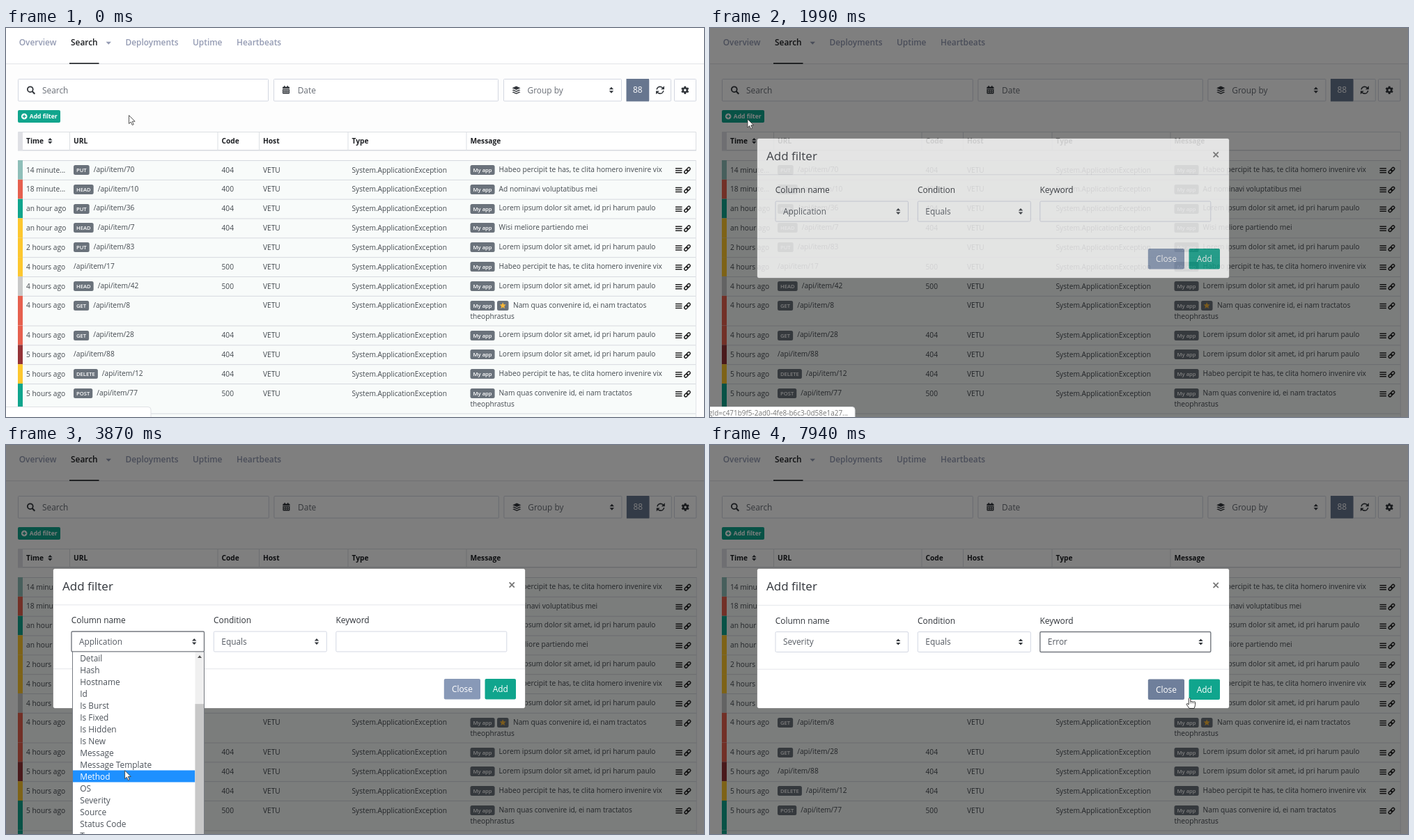
An HTML page with a canvas that plays this animation: 1002x559 px, repeating every 8000 ms.

```html
<!DOCTYPE html>
<html lang="en">
<head>
<meta charset="utf-8">
<title>Add filter</title>
<style>
html, body { margin: 0; width: 1002px; height: 559px; overflow: hidden; background: #fff; }
canvas { display: block; }
</style>
</head>
<body>
<canvas id="stage" width="1002" height="559"></canvas>
<script>
const W = 1002, H = 559, LOOP = 8000;
const screen2d = document.getElementById('stage').getContext('2d');
const sheet = Object.assign(document.createElement('canvas'), { width: W, height: H });
const sheet2d = sheet.getContext('2d');
let g = screen2d;

const GREEN = '#10a58d', YELLOW = '#fdc72f', RED = '#e6604f', INK = '#43494f', LINE = '#d6d9df', SLATE = '#6a727b';
const HOST = 'VETU', TYPE = 'System.ApplicationException';
const HABEO = 'Habeo percipit te has, te clita homero invenire vix';
const LOREM = 'Lorem ipsum dolor sit amet, id pri harum paulo';
const NAM = ['Nam quas convenire id, ei nam tractatos', 'theophrastus'];
const ROWS = [
  ['#8fbfb9', '14 minute...', 'PUT', 70, 404, HABEO],
  [RED, '18 minute...', 'HEAD', 10, 400, 'Ad nominavi voluptatibus mei'],
  [GREEN, 'an hour ago', 'PUT', 36, 404, LOREM],
  [YELLOW, 'an hour ago', 'HEAD', 7, 404, 'Wisi meliore partiendo mei'],
  [YELLOW, '2 hours ago', 'PUT', 83, '', LOREM],
  [YELLOW, '4 hours ago', '', 17, 500, HABEO],
  ['#c8c8c8', '4 hours ago', 'HEAD', 42, 500, LOREM],
  [RED, '4 hours ago', 'GET', 8, '', NAM, true],
  [RED, '4 hours ago', 'GET', 28, 404, LOREM],
  ['#943337', '5 hours ago', '', 88, 404, LOREM],
  [YELLOW, '5 hours ago', 'DELETE', 12, 404, HABEO],
  [GREEN, '5 hours ago', 'POST', 77, 500, NAM]
];
const COLUMNS = ['Application', 'Assigned To', 'Browser', 'Client IP', 'Country', 'Detail', 'Hash', 'Hostname', 'Id',
  'Is Burst', 'Is Fixed', 'Is Hidden', 'Is New', 'Message', 'Message Template', 'Method', 'OS', 'Severity',
  'Source', 'Status Code', 'Type', 'URL', 'User'];
const LEVELS = ['Fatal', 'Error', 'Warning', 'Information', 'Debug', 'Verbose'];

// Bursts of change: start, end, steps. The picture rests between them.
const BURSTS = [[0, 0, 1], [280, 430, 3], [740, 1350, 9], [1520, 2300, 11], [2370, 3010, 9], [3240, 4030, 11],
  [4110, 4510, 6], [4750, 4750, 1], [4900, 4990, 2], [5130, 5910, 11], [5990, 6140, 3], [6370, 6610, 4],
  [7010, 7070, 2], [7240, 7310, 2], [7620, 7940, 5]];
const PATH = [[740, 176.5, 125.5], [1350, 54, 131], [2070, 54, 131], [2300, 150, 215], [2780, 181, 283],
  [3165, 181, 283], [3398, 179, 337], [4030, 169, 492], [4510, 165, 517], [5055, 165, 517], [5910, 593, 281],
  [6290, 593, 281], [6610, 576, 327], [7540, 576, 327], [7940, 688.5, 363.5]];
const CLICKS = [[1520, 1740], [2845, 3005], [4750, 4895], [5985, 6060], [7010, 7065]];

const ramp = (t, a, b) => Math.min(1, Math.max(0, (t - a) / (b - a)));
const smooth = p => p * p * (3 - 2 * p);
const within = (t, a, b) => t >= a && t < b;

function snap(t) {
  const [start, end, steps] = BURSTS.filter(b => b[0] <= t).pop();
  if (steps < 2) return start;
  const gap = (end - start) / (steps - 1);
  return start + gap * Math.min(steps - 1, Math.floor((t - start) / gap + .2));
}

function pointer(t) {
  const i = PATH.findIndex(p => p[0] > t);
  if (i === 0) return PATH[0].slice(1);
  if (i < 0) return PATH[PATH.length - 1].slice(1);
  const [t0, x0, y0] = PATH[i - 1], [t1, x1, y1] = PATH[i];
  const p = smooth(ramp(t, t0, t1));
  return [x0 + (x1 - x0) * p, y0 + (y1 - y0) * p];
}

function text(s, x, y, { size = 10.2, weight = 400, color = INK, align = 'left' } = {}) {
  g.font = `${weight} ${size}px "Open Sans", sans-serif`;
  g.fillStyle = color;
  g.textAlign = align;
  g.fillText(s, x, y);
  return g.measureText(s).width;
}

function rect(x, y, w, h, fill) {
  g.fillStyle = fill;
  g.fillRect(x, y, w, h);
}

function box(x, y, w, h, fill, stroke, radius = 0, width = 1) {
  g.beginPath();
  g.roundRect(x, y, w, h, radius);
  if (fill) { g.fillStyle = fill; g.fill(); }
  if (stroke) { g.strokeStyle = stroke; g.lineWidth = width; g.stroke(); }
}

function disc(x, y, r, fill) {
  g.beginPath();
  g.arc(x, y, r, 0, 7);
  g.fillStyle = fill;
  g.fill();
}

function poly(points, fill, stroke, width = 1) {
  g.beginPath();
  points.forEach(p => g.lineTo(...p));
  g.closePath();
  if (fill) { g.fillStyle = fill; g.fill(); }
  if (stroke) { g.strokeStyle = stroke; g.lineWidth = width; g.stroke(); }
}

function stroke(width, color, ...lines) {
  g.beginPath();
  for (const [x0, y0, x1, y1] of lines) { g.moveTo(x0, y0); g.lineTo(x1, y1); }
  g.strokeStyle = color;
  g.lineWidth = width;
  g.stroke();
}

function at(x, y, draw, scale = 1, turn = 0) {
  g.save();
  g.translate(x, y);
  g.rotate(turn);
  g.scale(scale, scale);
  draw();
  g.restore();
}

function carets(x, y, gap = 1, color = '#33373c') {
  for (const d of [-1, 1])
    poly([[x - 3.2, y + d * gap], [x + 3.2, y + d * gap], [x, y + d * (gap + 3.5)]], color);
}

function badge(s, x, y) {
  g.font = '600 7.65px "Open Sans", sans-serif';
  const w = g.measureText(s).width + 8;
  box(x, y, w, 14, SLATE, null, 2.5);
  text(s, x + 4, y + 10, { size: 7.65, weight: 600, color: '#fff' });
  return x + w;
}

function star() {
  const points = Array.from({ length: 10 }, (_, i) => {
    const r = i % 2 ? 2.2 : 4.8, a = i * Math.PI / 5;
    return [r * Math.sin(a), -r * Math.cos(a)];
  });
  poly(points, '#f8b838');
}

function link() {
  for (const d of [-1, 1]) box(d * 2.3 - 2.9, -1.9, 5.8, 3.8, null, '#222', 1.9, 1.5);
}

function gear() {
  for (let i = 0; i < 6; i++) at(0, 0, () => rect(-1.4, -5.6, 2.8, 3, '#33373c'), 1, i * Math.PI / 3);
  g.beginPath();
  g.arc(0, 0, 3, 0, 7);
  g.strokeStyle = '#33373c';
  g.lineWidth = 2.5;
  g.stroke();
}

function refresh() {
  for (const turn of [0, Math.PI]) at(0, 0, () => {
    g.beginPath();
    g.arc(0, 0, 4.9, Math.PI * 1.06, Math.PI * 1.78);
    g.strokeStyle = '#33373c';
    g.lineWidth = 1.6;
    g.stroke();
    poly([[6, -6], [6, -1.1], [1.1, -1.1]], '#33373c');
  }, 1, turn);
}

function layers() {
  poly([[0, -5.8], [6, -3], [0, -.2], [-6, -3]], '#33373c');
  for (const y of [0, 3])
    poly([[-6, y], [-4.2, y - .8], [0, y + 1.1], [4.2, y - .8], [6, y], [0, y + 2.8]], '#33373c');
}

function calendar() {
  box(-5, -4.5, 10, 10, '#33373c', null, 1);
  rect(-3, -6, 1.5, 2, '#33373c');
  rect(1.5, -6, 1.5, 2, '#33373c');
  rect(-5, -2, 10, .8, '#fff');
  for (let i = 0; i < 6; i++) rect(-3.6 + i % 3 * 2.8, Math.floor(i / 3) * 2.5, 1.5, 1.4, '#fff');
}

function toolbar(dx) {
  const hint = { size: 11.9, color: '#6a6f77' };
  const field = (x, right) => box(x, 73.5, right - x, 31.5, '#fff', '#d3d7e1', 1);
  field(17.5, 376.5 + dx);
  g.beginPath();
  g.arc(34.8, 88.2, 3.9, 0, 7);
  g.strokeStyle = '#33373c';
  g.lineWidth = 1.8;
  g.stroke();
  stroke(2.1, '#33373c', [37.6, 91, 41.3, 94.7]);
  text('Search', 52, 93.7, hint);
  field(384.5 + dx / 2, 706.5 + dx);
  at(402 + dx / 2, 89, calendar);
  text('Date', 418.7 + dx / 2, 93.7, hint);
  field(714.5 + dx / 2, 883.5 + dx / 2);
  at(732.5 + dx, 89.3, layers);
  text('Group by', 748.5 + dx, 93.7, hint);
  carets(869 + dx, 89.3);
  field(923.5, 954.5 + dx);
  rect(890.5 + dx / 2, 73, 32.5, 32.5, '#67768f');
  text('88', 906.8 + dx / 2, 93.2, { size: 11.9, color: '#fff', align: 'center' });
  at(939 + dx, 89.3, refresh);
  field(959.5, 990.5 + dx / 2);
  at(974.8 + dx / 2, 89.3, gear);
}

function row([stripe, time, method, item, code, message, starred], y, dx) {
  const lines = [].concat(message), h = lines.length > 1 ? 42.7 : 27.83;
  const tag = Math.round(y + 7);
  rect(17, y, 973.5 + dx, h, '#f8fbfa');
  rect(17, y, 973.5 + dx, 1, LINE);
  rect(17, y, 7, h + .5, stripe);
  text(time, 29, y + 17.6);
  const x = method ? badge(method, 97, tag) + 6 : 97;
  text('/api/item/' + item, x, y + 16.7);
  text(code, 309.5, y + 17.6);
  text(HOST, 369, y + 17.6);
  text(TYPE, 496.5, y + 17.6);
  let mx = badge('My app', 666.5, tag) + 6;
  if (starred) {
    box(705, tag, 16.5, 14, SLATE, null, 2.5);
    at(713.2, tag + 7, star);
    mx = 728;
  }
  text(lines[0], mx, y + 16.7);
  if (lines[1]) text(lines[1], 666.5, y + 32.7);
  const ly = y + 14.7;
  stroke(1.5, '#222', ...[-3, 0, 3].map(d => [961 + dx / 2, ly + d, 970.5 + dx / 2, ly + d]));
  at(978 + dx / 2, ly, link, 1, -Math.PI / 4);
  return y + h;
}

function page(dx) {
  rect(0, 0, W, H, '#fdfdfd');
  rect(0, 0, W, 51, '#fff');
  rect(0, 51, W, 1, '#e2e4e8');
  const nav = { size: 11.9, weight: 600, color: '#949bb3' };
  text('Overview', 18.7, 25.4, nav);
  text('Search', 93, 25.4, { ...nav, color: '#1c1e22' });
  poly([[143.5, 19.8], [151, 19.8], [147.25, 23.8]], '#949bb3');
  text('Deployments', 171.5, 25.4, nav);
  text('Uptime', 268, 25.4, nav);
  text('Heartbeats', 331, 25.4, nav);
  rect(91, 50, 42.5, 1.6, '#1c1e22');

  toolbar(dx);

  box(17, 118, 61, 18, GREEN, null, 2);
  disc(26.2, 127, 4.3, '#fff');
  stroke(1.4, GREEN, [23.8, 127, 28.6, 127], [26.2, 124.6, 26.2, 129.4]);
  text('Add filter', 33.8, 130.2, { size: 8.5, weight: 700, color: '#fff' });

  box(17.5, 149.5, 973 + dx, 26, '#fff', '#dcdfe3');
  rect(17, 175, 974 + dx, 1.5, LINE);
  rect(17, 150, 7, 26, '#dfe0e5');
  for (const x of [91, 303.5, 363, 490.5, 660.5]) rect(x, 150, 1, 26, '#dcdfe3');
  const heads = { Time: 29, URL: 97, Code: 309.5, Host: 369, Type: 496.5, Message: 666.5 };
  for (const name in heads) text(name, heads[name], 165.7, { weight: 700, color: '#1c1e22' });
  carets(63.3, 162.3, .8);

  let y = 190;
  for (const r of ROWS) y = row(r, y, dx);
  rect(17, y, 973.5 + dx, 9, '#f8fbfa');
  rect(17, y, 973.5 + dx, 1, LINE);
  rect(17, y, 7, 9, GREEN);
  rect(990 + dx, 190, 1, 369, '#e2e5e9');
}

function select(x, right, value, focused, arrows = true) {
  box(x, 268, right - x, 29, '#fff', focused ? '#74787f' : '#d3d7e3', 1.5, focused ? 1.4 : 1);
  text(value, x + 11, 286.8, { size: 11.9, color: '#555a62' });
  if (arrows) carets(right - 14.3, 282.5);
}

function button(label, x, w, fill) {
  box(x, 336, w, 29.5, fill, null, 2);
  text(label, x + w / 2, 355, { size: 11.9, color: '#fff', align: 'center' });
}

function modal(t, dy, closeHover) {
  box(67.5, 177.5, 678, 201, '#fff', 'rgba(0,0,0,.25)', 3);
  g.translate(0, dy);
  rect(68, 229.3, 677, 1, '#e4e6ea');
  rect(68, 321.2, 677, 1, '#e4e6ea');
  text('Add filter', 81, 208.7, { size: 17, color: '#30343a' });
  stroke(1.8, '#777', [722.6, 197.4, 729.8, 204.6], [729.8, 197.4, 722.6, 204.6]);
  const label = { size: 11.9, color: '#30343a' };
  text('Column name', 93.7, 256.3, label);
  text('Condition', 298, 256.3, label);
  text('Keyword', 473.5, 256.3, label);
  const picked = t >= 4980;
  select(94, 284.5, t >= 4900 ? 'Severity' : 'Application', within(t, 2845, 5985));
  select(298.3, 460.3, 'Equals');
  select(473.8, 718.8, !picked ? '' : t >= 7240 ? 'Error' : 'Fatal', t >= 5985, picked);
  button('Close', 628.8, 52.2, closeHover ? '#6f7f9b' : '#8899b7');
  button('Add', 687.5, 44.5, GREEN);
}

function list(options, x, right, bottom, scroll, hover, barWidth) {
  const top = 297.5;
  g.save();
  g.beginPath();
  g.rect(x - 1, top - .5, right - x + 2, bottom - top + 1);
  g.clip();
  rect(x, top - .5, right - x, bottom - top + .5, '#fff');
  options.forEach((name, i) => {
    const y = top + 17 * i - scroll;
    if (i === hover) rect(x, y, right - x - barWidth, 17, '#1e90ff');
    text(name, x + 10.7, y + 13, { size: 11.9, color: i === hover ? '#fff' : '#4d535a' });
  });
  if (barWidth) {
    rect(right - barWidth, top, barWidth, bottom - top, '#f0f0f0');
    rect(right - barWidth, 309.5 + .737 * scroll, barWidth, bottom, '#c8c8c8');
    poly([[right - 9.5, 306], [right - 3.5, 306], [right - 6.5, 302.3]], '#505050');
  }
  box(x, top - .5, right - x, bottom - top, null, '#777b82');
  g.restore();
}

function bubble(alpha, label) {
  g.globalAlpha = alpha;
  box(-4, 544.5, 212, 20, '#fff', '#dfe1e4', 4);
  if (label) text(label, 198, 556.5, { size: 9.95, color: '#777', align: 'right' });
  g.globalAlpha = 1;
}

function arrow() {
  poly([[0, 0], [0, 16], [3.7, 12.6], [6.3, 18.6], [8.9, 17.5], [6.4, 11.6], [11.5, 11.6]], '#fff', '#333', 1.1);
}

function hand() {
  g.beginPath();
  g.moveTo(-1.3, 9.5);
  g.lineTo(-1.3, 1);
  g.quadraticCurveTo(0, -1, 1.3, 1);
  g.lineTo(1.3, 5);
  for (const x of [3.6, 5.9, 8]) g.quadraticCurveTo(x - .6, 4, x, 6);
  g.lineTo(8, 10);
  g.quadraticCurveTo(7.8, 12.5, 6.5, 15);
  g.lineTo(-.5, 15);
  g.quadraticCurveTo(-2.5, 12, -4.6, 9);
  g.quadraticCurveTo(-3.8, 6.7, -1.3, 9.5);
  g.closePath();
  g.fillStyle = '#fff';
  g.fill();
  g.strokeStyle = '#222';
  g.lineWidth = .9;
  g.stroke();
  stroke(.7, '#444', [1.3, 5, 1.3, 8], [3.6, 6, 3.6, 8], [5.9, 6, 5.9, 8]);
}

function draw(t) {
  const [x, y] = pointer(t);
  const closeHover = t > 7600 && x > 629 && y > 336;
  const shade = ramp(t, 1727, 1877);
  g = screen2d;
  page(shade > 0 ? .8 : 0);
  rect(0, 0, W, H, `rgba(0,0,0,${shade / 2})`);

  const fade = ramp(t, 1873, 2018);
  if (fade > 0) {
    const settle = Math.pow(1 - ramp(t, 1873, 2173), 1.68);
    g = sheet2d;
    g.clearRect(0, 0, W, H);
    g.save();
    modal(t, t >= 4980 ? .5 : 0, closeHover);
    g.restore();
    g = screen2d;
    g.globalAlpha = fade;
    g.drawImage(sheet, 0, Math.round(-42.5 * settle));
    g.globalAlpha = 1;
  }

  const scroll = 85 * smooth(ramp(t, 3280, 3870));
  const hover = offset => Math.max(0, Math.floor((y - 297.5 + offset) / 17));
  if (within(t, 2925, 4900)) list(COLUMNS, 95.5, 284.5, 570, scroll, hover(scroll), 13);
  if (within(t, 6060, 7240)) at(0, .5, () => list(LEVELS, 475, 719.5, 400.5, 0, hover(0), 0));

  const idle = 1 - ramp(t, 205, 430);
  if (idle > 0) bubble(idle);
  const status = ramp(t, 1440, 1600) * (1 - ramp(t, 2070, 2230));
  if (status > 0) bubble(status, 'gId=c471b9f5-2ad0-4fe8-b6c3-0d58e1a27...');

  if (CLICKS.some(([a, b]) => within(t, a, b))) disc(x - .3, y + .4, 10.3, 'rgba(215,215,30,.75)');
  if (within(t, 1265, 1740) || closeHover) at(x, y, hand);
  else at(x, y, arrow, .75);
}

function frame(now) {
  draw(snap(now % LOOP));
  requestAnimationFrame(frame);
}
requestAnimationFrame(frame);
</script>
</body>
</html>
```
